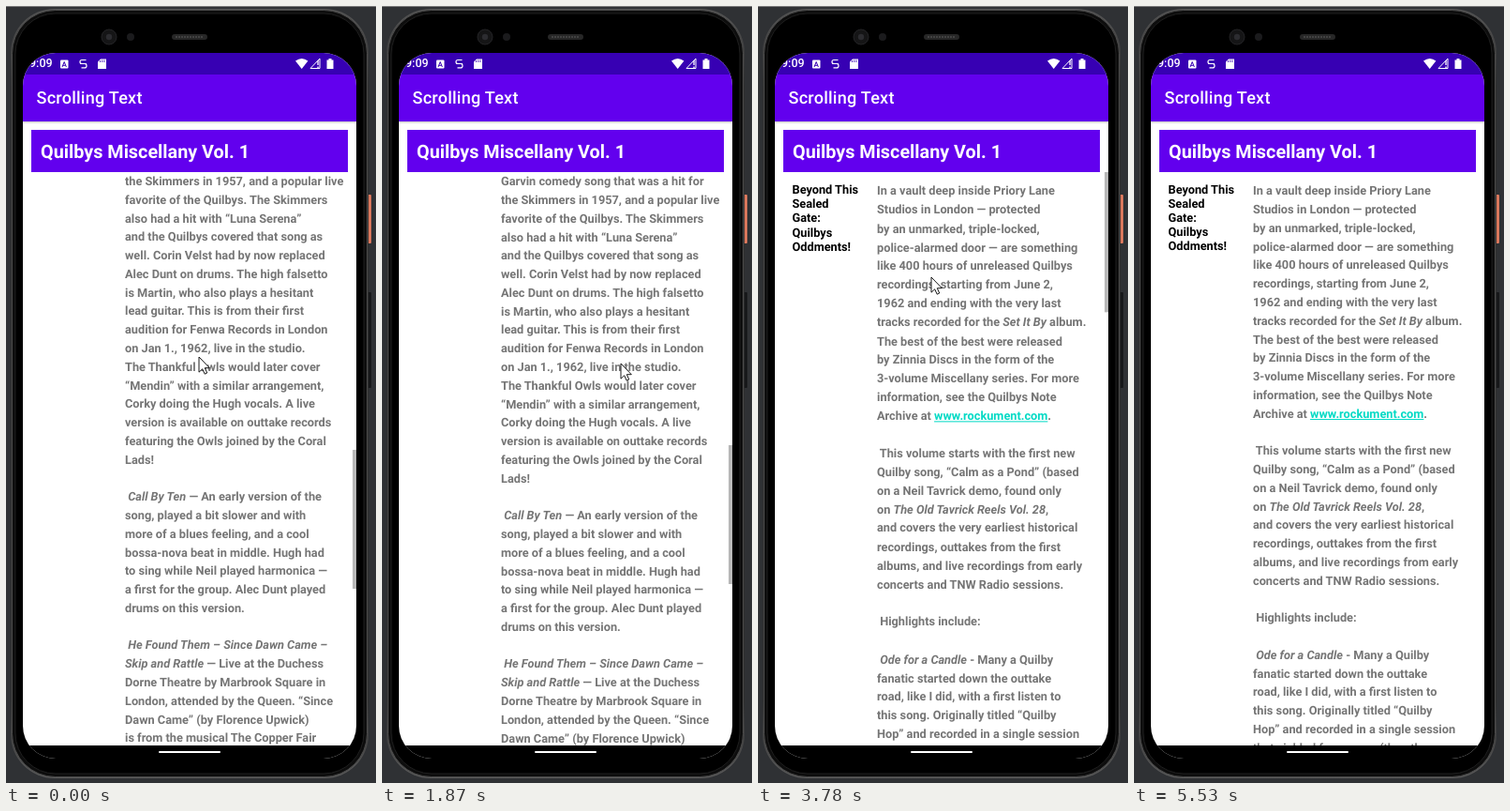
Write an HTML page that moves like this. It is 395x828 px and loops after 6.03 s.

```html
<!DOCTYPE html>
<html lang="en">
<head>
<meta charset="utf-8">
<title>Scrolling Text</title>
<style>
  html, body { margin: 0; width: 100%; height: 100%; overflow: hidden; background: #2f3134; }
  body { position: relative; font-family: Roboto, sans-serif; text-rendering: geometricPrecision; }
  body > *, #screen > *, #view > *, #stretch > *, #content > * { position: absolute; margin: 0; }
  #screen { left: 18px; top: 50px; width: 356px; height: 752px; border-radius: 35px; overflow: hidden; background: #fff; }
  #status { width: 356px; height: 23px; background: #3700b3; }
  #clock { left: 7px; top: 4px; font: 500 12.5px/16px Roboto, sans-serif; color: #fff; }
  #appbar { top: 23px; width: 356px; height: 50px; background: #6200ee; box-shadow: 0 1px 2px #0004; }
  #appbar span { position: absolute; left: 14.5px; top: 12.5px; font: 500 18.1px/25px Roboto, sans-serif; letter-spacing: .0125em; color: #fff; }
  #heading { left: 9px; top: 82px; width: 328px; height: 45px; padding-left: 10px; background: #6200ee; color: #fff; font: bold 19.8px/47.5px Roboto, sans-serif; white-space: nowrap; }
  #view { top: 127px; width: 356px; height: 611px; overflow: hidden; }
  #stretch, #content { width: 356px; height: 100%; }
  pre { white-space: pre; font: bold 12.75px Roboto, sans-serif; }
  #side { left: 18.5px; top: 11.5px; line-height: 15.24px; color: #000; }
  #article { left: 109px; top: 11.3px; line-height: 19.78px; color: #757575; }
  #article u { color: #03dac5; }
  #thumb { left: 352.3px; width: 3.7px; height: 148.3px; background: #b8b8b8; }
  #nav { top: 738px; width: 356px; height: 14px; background: #000; }
  #nav::after { content: ""; position: absolute; left: 145px; top: 5.5px; width: 66px; height: 2.5px; border-radius: 2px; background: #fff; }
  svg { left: 0; top: 0; }
</style>
</head>
<body>
<svg width="395" height="828">
  <defs>
    <linearGradient id="rim" x2="0" y2="1">
      <stop stop-color="#565656"/><stop offset=".1" stop-color="#303030"/>
      <stop offset=".9" stop-color="#303030"/><stop offset="1" stop-color="#5a5a5a"/>
    </linearGradient>
  </defs>
  <path d="M0 .5H395" stroke="#777"/>
  <rect x="386" y="201" width="4" height="52" rx="1" fill="#d9775c"/>
  <rect x="386" y="305" width="4" height="102" rx="1" fill="#17181a"/>
  <rect x="5" y="3" width="382" height="820" rx="47" fill="url(#rim)"/>
  <rect x="6.5" y="4.5" width="379" height="817" rx="46" fill="#0d0d0d" stroke="#4a4a4a"/>
  <rect x="10" y="8" width="372" height="810" rx="43" fill="#000" stroke="#1e1e1e"/>
  <circle cx="110" cy="33" r="8" fill="#151516" stroke="#242426"/>
  <circle cx="110" cy="33" r="3.2" fill="#2c2c30"/>
  <circle cx="133" cy="33" r="4" fill="#1b1b1d"/>
  <rect x="177" y="30" width="38" height="6" rx="3" fill="#272727"/>
  <path d="M181 33h30" stroke="#424242" stroke-width="2" stroke-dasharray="2 1"/>
</svg>

<div id="screen">
  <div id="status"></div>
  <div id="clock">9:09</div>
  <div id="appbar"><span>Scrolling Text</span></div>
  <div id="heading">Quilbys Miscellany Vol. 1</div>
  <div id="view"><div id="stretch">
    <div id="content">
<pre id="side">Beyond This
Sealed
Gate:
Quilbys
Oddments!</pre>
<pre id="article">In a vault deep inside Priory Lane
Studios in London — protected
by an unmarked, triple-locked,
police-alarmed door — are something
like 400 hours of unreleased Quilbys
recordings, starting from June 2,
1962 and ending with the very last
tracks recorded for the <i>Set It By</i> album.
The best of the best were released
by Zinnia Discs in the form of the
3-volume Miscellany series. For more
information, see the Quilbys Note
Archive at <u>www.rockument.com</u>.

 This volume starts with the first new
Quilby song, “Calm as a Pond” (based
on a Neil Tavrick demo, found only
on <i>The Old Tavrick Reels Vol. 28</i>,
and covers the very earliest historical
recordings, outtakes from the first
albums, and live recordings from early
concerts and TNW Radio sessions.

 Highlights include:

 <i>Ode for a Candle</i> - Many a Quilby
fanatic started down the outtake
road, like I did, with a first listen to
this song. Originally titled “Quilby
Hop” and recorded in a single session
that yielded four songs (the other
three featured Ivor Brackwell with the
Quilbys as a backing band), “Ode for a
Candle” is an instrumental written by
Tavrick and Wendlow, which makes it
unique to this day. Neil Tavrick plays
rhythm guitar, Martin Wendlow plays
lead guitar, Hugh Castelbury plays
bass, and Alec Dunt plays drums.
The sessions were produced by Otto
Lindgraber in Hamburg, Germany,
during the Quilbys’ second visit from
April through July of that year. The
band played long nights in the clubs
and learned to fill the hours with any
song they knew. These early tapes
show a tight group with plenty of
energy and a taste for odd tunes.

 The next few tracks were made at
home with a borrowed machine. The
sound is rough, but the voices are
already blending in close harmony,
and the guitars are easy to pick out.
A few were later played on stage and
others were never heard again.

 <i>Mendin</i> — Recorded live in a single
take at the start of the year, it is a
fast and funny tune, first known as a
Garvin comedy song that was a hit for
the Skimmers in 1957, and a popular live
favorite of the Quilbys. The Skimmers
also had a hit with “Luna Serena”
and the Quilbys covered that song as
well. Corin Velst had by now replaced
Alec Dunt on drums. The high falsetto
is Martin, who also plays a hesitant
lead guitar. This is from their first
audition for Fenwa Records in London
on Jan 1., 1962, live in the studio.
The Thankful Owls would later cover
“Mendin” with a similar arrangement,
Corky doing the Hugh vocals. A live
version is available on outtake records
featuring the Owls joined by the Coral
Lads!

 <i>Call By Ten</i> — An early version of the
song, played a bit slower and with
more of a blues feeling, and a cool
bossa-nova beat in middle. Hugh had
to sing while Neil played harmonica —
a first for the group. Alec Dunt played
drums on this version.

 <i>He Found Them – Since Dawn Came –
Skip and Rattle</i> — Live at the Duchess
Dorne Theatre by Marbrook Square in
London, attended by the Queen. “Since
Dawn Came” (by Florence Upwick)
is from the musical The Copper Fair
and was a favorite of the older part
of the audience. The group bows low
after every number and jokes with
the front rows between songs. Near
the end, Neil tells the people in the
cheaper seats to clap their hands, and
the rest to “rattle your jewelry” and
then announces “Skip and Rattle” (a
song by Clem Hadrow and Walt Orbury
that was first recorded in 1962 by
the Ormal Cousins). A film of the
performance shows the Queen smiling
at Neil’s remark.

 <i>Bring My Parrot Inside</i> — One of the
lost Quilby songs recorded during
the “Quilbys On Loan” sessions but
never released. This song, written by
Young Dexie Crale, Rufus Sandol, and
Henry Ockford, was a 1959 R&amp;B
hit for Young Dexie Crale and covered
by Freddy Wendham before the Quilbys
tried it and shelved it. A reference to a
“big old mastiff” may have influenced
Neil’s “Oh Mastiff” (Orange
Dirigible album), which is a similar
rocker.

 <i>Two Before 616</i> — A song recorded for
the <i>Set It By</i> album was actually worked
on way back in the beginning, six years
earlier. This take shows how they did it
much more slowly, with an R&amp;B feel to
it.</pre>
    </div>
    <div id="thumb"></div>
  </div></div>
  <div id="nav"></div>
</div>

<svg width="395" height="828" fill="#fff">
  <rect x="58" y="57.5" width="8.5" height="9" rx="1"/>
  <path d="M60 65l2.2-5.5 2.2 5.5M60.8 63.3h2.8" fill="none" stroke="#3700b3"/>
  <path d="M85.5 57.5h-4.5q-2 0-2 2t2 2h3q2 0 2 2.2t-2 2.2h-3.5M79 61.5h7" fill="none" stroke="#fff" stroke-width="1.2"/>
  <path d="M101 56.5h6v10.500h-9v-7.500z"/>
  <path d="M100.5 60v-2M102.7 60v-2.5M104.9 60v-2.5" stroke="#3700b3" stroke-width=".8"/>
  <path d="M309 58.5q6.7-5 13.4 0L315.7 67z"/>
  <path d="M325 66.5L335 56v10.500z" fill="none" stroke="#fff"/>
  <path d="M333 58v5M333 64.5v1.5" stroke="#fff" stroke-width="1.3"/>
  <path d="M342.5 57.5h2v-1.500h3v1.500h2V67h-7z"/>
  <path id="cursor" d="M0 0V16.2L3.7 12.8L6.2 18.2L8.7 17L6.3 11.7H11.3Z" stroke="#000" stroke-width=".9"/>
</svg>

<script>
const LOOP = 6030, VIEW = 610, CONTENT = 2511, STEP = 125;
const END = CONTENT - VIEW;

// time, scroll, overscroll stretch, pointer x, pointer y
const keys = [
  [0, 1217, 0, 206, 374],
  [130, 1340, 0, 206, 350],
  [630, END, 0, 206, 480],
  [780, END, .005, 206, 490],
  [1140, END, .0105, 205, 395],
  [1270, END, .005, 208, 340],
  [1390, 1800, 0, 225, 330],
  [1870, 1197, 0, 255, 381],
  [2110, 965, 0, 256, 560],
  [2250, 830, 0, 254, 380],
  [2880, 225.5, 0, 251, 516],
  [3030, 165, 0, 248, 540],
  [3270, 95, 0, 240, 560],
  [3410, 0, .006, 220, 330],
  [3780, 0, .009, 185, 289],
  [3920, 0, .004, 205, 420],
  [4040, 95, 0, 215, 540],
  [4180, 109.5, 0, 215, 502],
  [4450, 109.5, 0, 221, 312],
  [4600, 0, .004, 235, 540],
  [4720, 0, .012, 250, 805],
  [4870, 0, .008, 260, 806],
  [5230, 0, 0, 290, 800],
  [5380, 0, 0, 315, 793],
  [5530, 0, 0, 315, 793]
];

// The screen refreshes in steps of roughly an eighth of a second.
const poses = keys.flatMap((from, i) => {
  const to = keys[i + 1];
  if (!to) return [from];
  const steps = Math.round((to[0] - from[0]) / STEP);
  return Array.from({ length: steps }, (_, s) =>
    from.map((v, j) => v + (to[j] - v) * s / steps));
});

const [stretchBox, content, thumb, cursor] =
  ["stretch", "content", "thumb", "cursor"].map(id => document.getElementById(id));

function draw() {
  const now = performance.now() % LOOP;
  const [time, scroll, stretch, x, y] = poses.filter(p => p[0] <= now).pop();
  stretchBox.style.transformOrigin = scroll > END / 2 ? "bottom" : "top";
  stretchBox.style.transform = stretch ? `scaleY(${1 + stretch})` : "none";
  content.style.transform = `translateY(${-scroll}px)`;
  thumb.style.top = scroll * VIEW / CONTENT + "px";
  thumb.style.visibility = time < 5380 ? "visible" : "hidden";
  cursor.setAttribute("transform", `translate(${x} ${y})`);
  cursor.style.visibility = time < 5530 ? "visible" : "hidden";
  requestAnimationFrame(draw);
}
draw();
</script>
</body>
</html>
```
